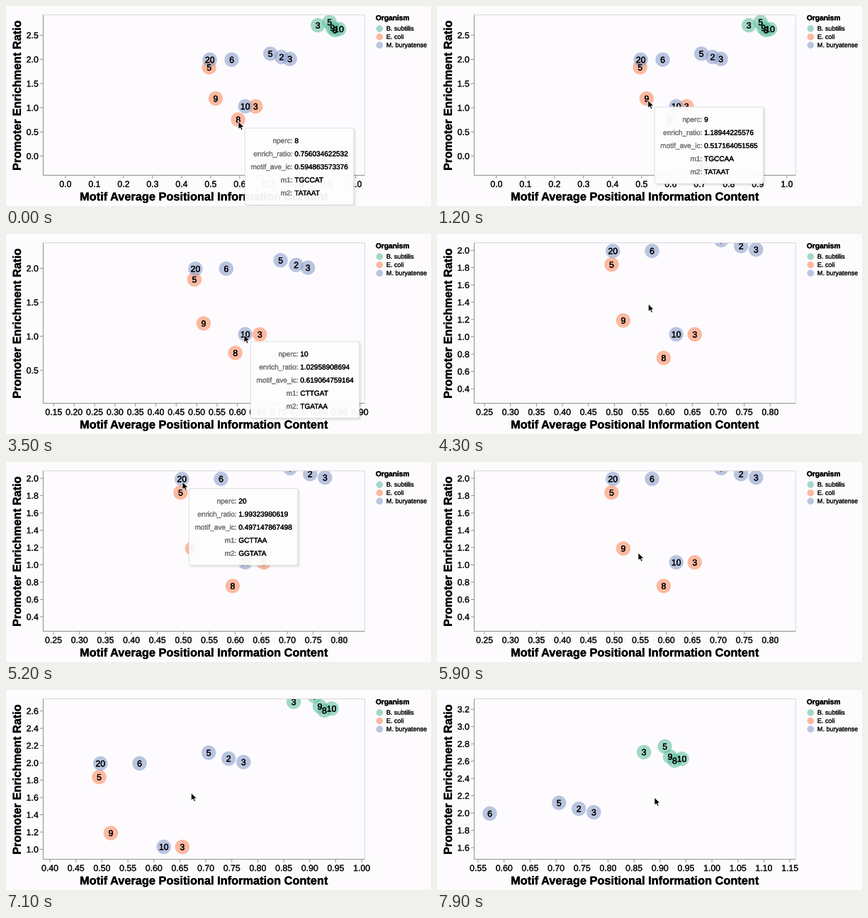
A matplotlib script for the animation above (8 s loop, 600 by 283 pixels).

```python
import math

import matplotlib.pyplot as plt
import numpy as np
from matplotlib.animation import FuncAnimation
from matplotlib.patches import Circle, FancyBboxPatch, Polygon, Rectangle
from matplotlib.patheffects import withStroke

W, H, DPI = 600, 283, 100
STEP, FRAMES = 100, 80
PX = 72 / DPI
BG = "#fdfbfe"
LEFT, TOP, RIGHT, BOTTOM = 52.5, 12.5, 506.5, 239.5
RADIUS = 10.2

SPECIES = {
    "B. subtilis": "#66c2a5",
    "E. coli": "#fc8d62",
    "M. buryatense": "#8da0cb",
}

# species, label, average content, enrichment ratio, motif pair
POINTS = [
    ("B. subtilis", 3, 0.869214307512, 2.70482215903, "TTGACA", "TATAAT"),
    ("B. subtilis", 5, 0.909371846025, 2.77016438217, "TTGACA", "TATAAT"),
    ("B. subtilis", 9, 0.919427160384, 2.65218730946, "TTGACT", "TATAAT"),
    ("B. subtilis", 8, 0.928153629471, 2.60591473852, "TTGACA", "TATAAT"),
    ("B. subtilis", 10, 0.942018573926, 2.62739185046, "TTGACA", "TAAAAT"),
    ("E. coli", 3, 0.654728190356, 1.02817364592, "TTGACA", "TATAAT"),
    ("E. coli", 5, 0.494681735202, 1.83610427731, "TTGCCA", "TATAAT"),
    ("E. coli", 8, 0.594863573376, 0.756034622532, "TGCCAT", "TATAAT"),
    ("E. coli", 9, 0.517164051565, 1.18944225576, "TGCCAA", "TATAAT"),
    ("M. buryatense", 1, 0.705816392748, -0.19037281546, "CTTGAC", "TATAAT"),
    ("M. buryatense", 2, 0.743918265037, 2.04961837205, "TTGACA", "TATAAT"),
    ("M. buryatense", 3, 0.772641908353, 2.00914752836, "TTGACA", "TAAAAT"),
    ("M. buryatense", 5, 0.705673918246, 2.11748263905, "TTGACA", "TATAAT"),
    ("M. buryatense", 6, 0.572491836075, 1.99417362508, "CTTGAA", "TATAAT"),
    ("M. buryatense", 10, 0.619064759164, 1.02958908694, "CTTGAT", "TGATAA"),
    ("M. buryatense", 20, 0.497147867498, 1.99323980619, "GCTTAA", "GGTATA"),
]

# time in ms, pointer x, pointer y
PATH = np.array([
    (100, 328, 163.3), (500, 318, 155), (900, 301, 139), (1200, 297.8, 133.3),
    (1500, 297.8, 133.3), (2300, 323, 140.5), (2400, 323, 140.5),
    (2700, 336, 142.5), (4100, 336, 142.5), (4450, 270, 66),
    (4800, 249, 28), (5400, 249, 28), (5700, 182, 85), (6000, 335, 150),
    (6300, 344.5, 63), (6400, 344.5, 63), (6600, 323, 84),
    (7000, 229.5, 143), (7300, 325, 150), (7500, 421, 81), (7900, 307, 152),
])
DRAGS = [(6400, 7000), (7500, 7900)]

# the wheel zoom keeps this data position fixed on the stage
FOCUS_DATA = np.array([0.619064759164, 1.02958908694])
FOCUS_PX = np.array([337.7, 141.9])
SCALE, ASPECT, ZOOM = 410, 0.1669, 1.789

plt.rcParams["text.hinting"] = "none"
fig = plt.figure(figsize=(W / DPI, H / DPI), dpi=DPI, facecolor=BG)
ax = fig.add_axes([0, 0, 1, 1])


def pointer(t):
    return np.array([np.interp(t, PATH[:, 0], PATH[:, k]) for k in (1, 2)])


def view(t):
    """Origin and pixels per unit of the zoomed and panned scales."""
    zoom = ZOOM ** np.clip((t - 2680) / 1400, 0, 1)
    unit = SCALE * zoom * np.array([1, -ASPECT])
    origin = FOCUS_PX - FOCUS_DATA * unit
    for start, end in DRAGS:
        origin = origin + pointer(np.clip(t, start, end)) - pointer(start)
    return origin, unit


def tick_values(low, high, count):
    raw = (high - low) / count
    power = 10 ** math.floor(math.log10(raw))
    error = raw / power
    factor = 10 if error >= 50 ** 0.5 else 5 if error >= 10 ** 0.5 else 2 if error >= 2 ** 0.5 else 1
    step = factor * power
    places = max(0, -math.floor(math.log10(step) + 1e-9))
    indices = range(math.ceil(low / step), math.floor(high / step) + 1)
    return [(i * step, f"{i * step:.{places}f}") for i in indices]


def write(x, y, text, size, ha="left", color="#111111", **kw):
    """Slightly thickened text with its capitals centred on y."""
    effect = [withStroke(linewidth=0.3 * PX, foreground=color)]
    return ax.text(x, y + 0.358 * size, text, fontsize=size * PX, ha=ha, va="baseline",
                   color=color, family="Liberation Sans", path_effects=effect, **kw)


def line(xs, ys, color="#8c8c8c"):
    ax.plot(xs, ys, color=color, lw=0.95 * PX, zorder=1, snap=False,
            solid_capstyle="butt", solid_joinstyle="miter")


def draw_axes(origin, unit):
    line([LEFT, RIGHT, RIGHT], [TOP, TOP, BOTTOM], "#d8d8da")
    line([LEFT, LEFT, RIGHT], [TOP, BOTTOM, BOTTOM])
    low = (np.array([LEFT, BOTTOM]) - origin) / unit
    high = (np.array([RIGHT, TOP]) - origin) / unit
    for value, label in tick_values(low[0], high[0], 13):
        x = origin[0] + value * unit[0]
        line([x, x], [BOTTOM, BOTTOM + 4.5])
        write(x, 251.7, label, 12.3, "center")
    for value, label in tick_values(low[1], high[1], 7):
        y = origin[1] + value * unit[1]
        line([LEFT - 4.5, LEFT], [y, y])
        write(45.8, y, label, 12.3, "right")
    write(279.5, 269.3, "Motif Average Positional Information Content", 16.35,
          "center", "black", weight="bold")
    write(21, 126.5 - 0.358 * 16.35, "Promoter Enrichment Ratio", 16.35, "center", "black",
          weight="bold", rotation=90, rotation_mode="anchor")


def draw_legend():
    write(522, 16.5, "Organism", 10.2, color="black", weight="bold")
    for i, (name, color) in enumerate(SPECIES.items()):
        y = 32 + 11.7 * i
        ax.add_patch(Circle((527.4, y), 4.8, fc=color, alpha=0.6, lw=0))
        write(537, y - 0.4, name, 9.05)


def draw_points(origin, unit):
    frame = Rectangle((LEFT, TOP), RIGHT - LEFT, BOTTOM - TOP, transform=ax.transData)
    for name, n, x, y, *_ in POINTS:
        pos = origin + np.array([x, y]) * unit
        if not (LEFT - 20 < pos[0] < RIGHT + 20 and TOP - 20 < pos[1] < BOTTOM + 20):
            continue
        dot = Circle(pos, RADIUS, fc=SPECIES[name], alpha=0.6, lw=0, zorder=2)
        ax.add_patch(dot)
        dot.set_clip_path(frame)
        label = write(*pos, str(n), 12.3, "center", "black", zorder=3, clip_on=True)
        label.set_clip_path(frame)


def hovered(mouse, origin, unit):
    hit = None
    for point in POINTS:
        pos = origin + np.array(point[2:4]) * unit
        if math.dist(pos, mouse) <= RADIUS:
            hit = point
    return hit


def rounded(x, y, w, h, r, z, **kw):
    ax.add_patch(FancyBboxPatch((x, y), w, h, boxstyle=f"round,pad=0,rounding_size={r}",
                                zorder=z, **kw))


def draw_tooltip(mouse, point):
    _, n, x, y, m1, m2 = point
    left, top = mouse + (9.4, 9.6)
    w, h = 153.5, 108.5
    for grow in (2, 1, 0, -1):
        rounded(left + 1.8 - grow, top + 1.8 - grow, w + 2 * grow, h + 2 * grow,
                3 + grow, 5, fc="black", alpha=0.028, lw=0)
    rounded(left, top, w, h, 2.5, 6, fc=(1, 1, 1, 0.95), ec="#dcdcdc", lw=0.9 * PX)
    rows = [("nperc", str(n)), ("enrich_ratio", f"{y:.12g}"), ("motif_ave_ic", f"{x:.12g}"),
            ("m1", m1), ("m2", m2)]
    for i, (key, value) in enumerate(rows):
        row = top + 17.5 + 18.5 * i
        write(left + 67, row, key + ":", 10.05, "right", "#777777", zorder=7)
        write(left + 70, row, value, 10.05, color="black", zorder=7)


def draw_pointer(mouse):
    arrow = np.array([(0, 0), (0, 11.2), (2.6, 8.8), (4.3, 12.6), (6.2, 11.8),
                      (4.6, 8.1), (8, 7.9)])
    ax.add_patch(Polygon(arrow + mouse, fc="black", ec="white", lw=0.8 * PX, zorder=9))


def draw(i):
    t = i * STEP
    ax.clear()
    ax.set(xlim=(0, W), ylim=(H, 0))
    ax.axis("off")
    origin, unit = view(t)
    mouse = pointer(t)
    draw_axes(origin, unit)
    draw_legend()
    draw_points(origin, unit)
    point = hovered(mouse, origin, unit)
    if point:
        draw_tooltip(mouse, point)
    draw_pointer(mouse)
    return []


anim = FuncAnimation(fig, draw, frames=FRAMES, interval=STEP, init_func=lambda: [],
                     repeat=True, repeat_delay=0, blit=False)
plt.show()
```
